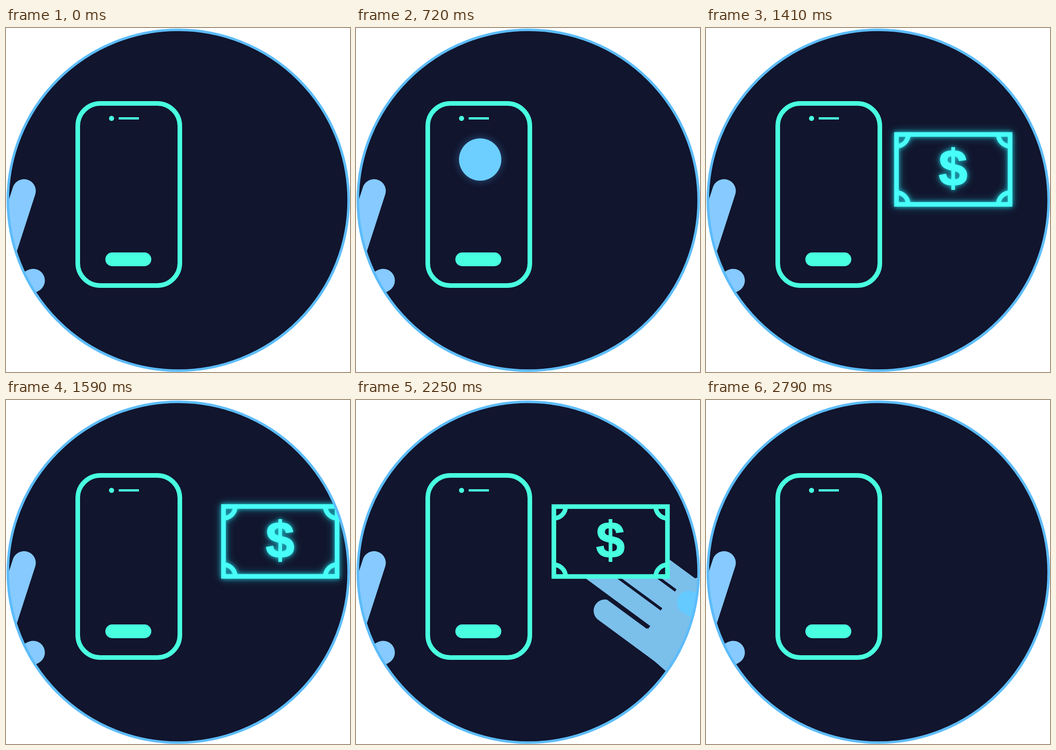
Animation, 748 px wide and 748 px high, one loop 3000 ms. Source, as an HTML page:

```html
<!DOCTYPE html>
<html lang="en">
<head>
<meta charset="utf-8">
<title>Phone to cash</title>
<style>
  html, body { margin: 0; height: 100%; overflow: hidden; background: #fff; }
  svg { display: block; width: 100%; height: 100%; }
  .line { fill: none; stroke: currentColor; stroke-width: 10; }
  .finger { fill: none; stroke-linecap: round; }
  text { font: bold 112px "Liberation Sans", Arial, sans-serif; text-anchor: middle; }
</style>
</head>
<body>
<svg viewBox="0 0 748 748">
  <defs>
    <clipPath id="disc"><circle cx="374.5" cy="374.5" r="372"/></clipPath>
    <clipPath id="inside"><rect x="156" y="164" width="222" height="396" rx="48"/></clipPath>
    <clipPath id="outside"><rect x="380" width="368" height="748"/></clipPath>
  </defs>
  <circle cx="374.5" cy="374.5" r="372" fill="#11152d"/>
  <g clip-path="url(#disc)">
    <g id="palm">
      <path fill="#7bbfeb" d="M636 496L666 455L696 414L740 386L1000 578L800 700L640 560Z"/>
      <path class="finger" stroke="#7bbfeb" stroke-width="49"
        d="M541 458l322 237M500 358l322 237M538 332l322 237M597 315l322 237"/>
      <path stroke="#11152d" stroke-width="6" d="M634 495l-113 -83M664 455l-113 -83M695 414l-113 -83"/>
    </g>
    <g clip-path="url(#outside)">
      <g id="bill">
        <path fill="#11152d" d="M430 231.5h247v152h-247z"/>
        <g id="ink">
          <path class="line" d="M430 231.5h247v152h-247z
            M455.5 231.5a25.5 25.5 0 0 1 -25.5 25.5M651.5 231.5a25.5 25.5 0 0 0 25.5 25.5
            M455.5 383.5a25.5 25.5 0 0 0 -25.5 -25.5M651.5 383.5a25.5 25.5 0 0 1 25.5 -25.5"/>
          <text x="553" y="343" fill="currentColor" stroke="currentColor" stroke-width="2">$</text>
        </g>
      </g>
    </g>
    <path id="thumb" class="finger" stroke="#64caff" stroke-width="51" d="M723 440l90 50"/>
    <g clip-path="url(#inside)">
      <circle id="coin" r="46" fill="#6ccfff"/>
    </g>
    <g color="#48ffdf">
      <rect class="line" x="156" y="164" width="222" height="396" rx="49"/>
      <circle cx="229.5" cy="196.5" r="5.5" fill="currentColor"/>
      <path d="M245 196.5h44" stroke="currentColor" stroke-width="5"/>
      <rect id="button" x="216" y="488" width="100" height="30" rx="15" fill="currentColor"/>
    </g>
    <g id="hand" fill="#86caff">
      <path d="M162 497L110 480L40 460L-80 520V800L60 700L107 613Z"/>
      <path class="finger" stroke="#86caff" stroke-width="51"
        d="M238 463L60 621M137 487L40 600M90 462L0 580M38 443L-60 560M156 641L60 636"/>
    </g>
  </g>
  <circle cx="374.5" cy="374.5" r="370.5" fill="none" stroke="#5dbcfa" stroke-width="5.5"/>
</svg>
<script>
const LOOP = 3000, STEP = 30;
const el = id => document.getElementById(id);
const [palm, bill, ink, thumb, coin, button, hand] =
  ["palm", "bill", "ink", "thumb", "coin", "button", "hand"].map(el);

const ramp = (t, a, b) => Math.min(1, Math.max(0, (t - a) / (b - a)));
const inOut = u => u < .5 ? 2 * u * u : 1 - 2 * (1 - u) ** 2;
const out = u => 1 - (1 - u) ** 3;
const move = (node, x, y) => node.setAttribute("transform", `translate(${x} ${y})`);

// Neon state: the colour shifts from mint to cyan as the halo grows.
function neon(node, k) {
  node.style.color = `rgb(72, 255, ${223 + 25 * k})`;
  node.style.filter = k
    ? `drop-shadow(0 0 5px rgba(40,240,245,${.75 * k})) drop-shadow(0 0 9px rgba(30,200,220,${.45 * k}))`
    : "none";
}

function draw(t) {
  const press = inOut(ramp(t, 0, 340)) - inOut(ramp(t, 450, 720));
  hand.setAttribute("transform", `rotate(${30.5 * (press - 1)} -61 773)`);
  neon(button, ramp(t, 240, 340) - ramp(t, 450, 600));

  // The coin rolls off into the side of the phone.
  const roll = Math.max(0, t - 1110) / 120;
  const pop = out(ramp(t, 560, 700));
  coin.setAttribute("transform",
    `translate(${270 + 67 * roll ** 2} ${286 + 23 * Math.min(1, roll ** 2)}) scale(${.6 + .4 * pop})`);
  coin.style.opacity = t < 1320 ? pop : 0;
  coin.style.filter = "drop-shadow(0 0 9px rgba(80,170,255,.4))";

  // The note slides out, settles back, and leaves with the hand.
  const leave = 226 * (Math.max(0, t - 2235) / 465) ** 2;
  const slide = -300 + 343 * out(ramp(t, 1250, 1610)) - 43 * inOut(ramp(t, 1630, 1980));
  move(bill, slide + leave, leave);
  bill.style.visibility = t > 1250 && t < 2790 ? "visible" : "hidden";
  neon(ink, 1 - ramp(t, 1620, 1800));

  const reach = 260 * (1 - inOut(ramp(t, 1620, 2160))) + leave;
  move(palm, reach, reach);
  move(thumb, reach, reach);
}

function tick(now) {
  draw(Math.floor(now % LOOP / STEP) * STEP);
  requestAnimationFrame(tick);
}
draw(0);
requestAnimationFrame(tick);
</script>
</body>
</html>
```
